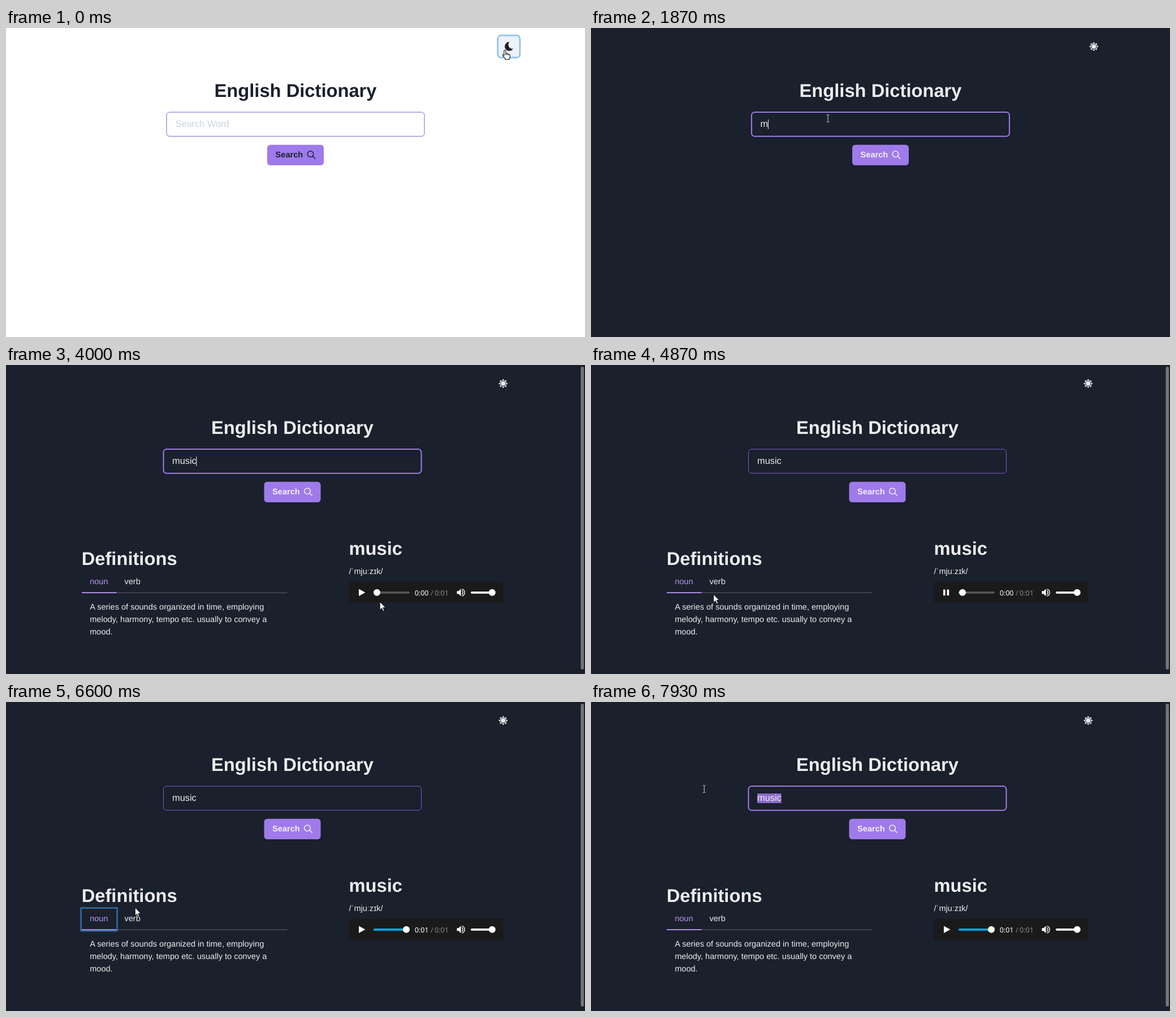
Write an HTML page that moves like this. It is 1024 by 547 pixels and loops after 8 s.

```html
<!DOCTYPE html>
<html lang="en">
<head>
<meta charset="utf-8">
<title>Dictionary</title>
<style>
  html, body { margin: 0; width: 100%; height: 100%; overflow: hidden; }
  svg {
    --bg: #1a202c; --fg: #ededee; --hint: #3e414b; --label: #f4f1fb; --ring: #326999;
    display: block; width: 1024px; height: 547px; background: var(--bg);
    font-family: "Liberation Sans", Arial, sans-serif; font-size: 14.55px;
    text-rendering: geometricPrecision;
  }
  svg.light { --bg: #fff; --fg: #1a202c; --hint: #cbd5da; --label: #1a202c; --ring: #8ec2ed; }
  text { fill: var(--fg); white-space: pre; }
  .title { font-size: 32.7px; font-weight: bold; }
  .field { font-size: 16.36px; }
  .hint { fill: var(--hint); }
  .label { fill: var(--label); font-weight: bold; }
  .time { font: 12.5px "Noto Sans", sans-serif; fill: #fff; }
  .dim { fill: #8a8a8a; }
  .ring { fill: none; stroke: var(--ring); stroke-width: 2.7; }
  .line { fill: none; stroke-linecap: round; }
  #dark, .light #moon { display: inline; }
  #moon, .light #dark { display: none; }
</style>
</head>
<body>
<svg id="stage" viewBox="0 0 1024 547">
  <g id="toggle">
    <g id="moon">
      <rect x="871" y="14.5" width="36.5" height="36.5" rx="5" fill="#edf2f7"/>
      <path d="M890.5 24.6A8 8 0 1 0 897 36.600A7.200 7.200 0 0 1 890.500 24.600Z" fill="#1a202c"/>
    </g>
    <g id="dark" transform="translate(889.3 32.800)">
      <path id="rays" fill="#ededee"/>
      <circle r="4.600" fill="none" stroke="#1a202c" stroke-width="1.100"/>
    </g>
    <rect id="toggleRing" class="ring" x="869.700" y="13.200" width="39.200" height="39.200" rx="6"/>
  </g>

  <g id="search">
    <text class="title" x="512" y="122" text-anchor="middle">English Dictionary</text>
    <rect id="box" x="284" y="149" width="456" height="42.700" rx="5.500" fill="none"/>
    <rect id="mark" y="162" height="17" fill="#8a6bcb"/>
    <text id="hint" class="field hint" x="299.500" y="175">Search Word</text>
    <text id="word" class="field" x="299.500" y="175"></text>
    <rect id="caret" y="162" width="1" height="17" fill="var(--fg)"/>
    <rect x="462" y="206.700" width="100" height="36.300" rx="5.500" fill="#9f7aea"/>
    <text class="label" x="476.600" y="229">Search</text>
    <path class="line" d="M543.800 223.200a5.300 5.300 0 1 1-10.600 0a5.300 5.300 0 1 1 10.600 0M542.500 227l4.300 4.200" stroke="var(--label)" stroke-width="1.500"/>
  </g>

  <g id="spinner" fill="none" stroke-width="3.600">
    <circle r="20" stroke="#e2e8f0"/>
    <path d="M-14.140-14.140A20 20 0 0 1 14.140 14.140" stroke="#805ad5"/>
  </g>

  <g id="result">
    <rect id="thumb" x="1016.500" y="3" width="5.500" height="536" rx="2.700" fill="#757578"/>
    <g id="defs">
      <text class="title" x="133.700" y="354">Definitions</text>
      <rect x="134" y="402.200" width="363.500" height="1.800" fill="#43464d"/>
      <rect id="nounBar" x="134" y="402.200" width="61.500" height="1.800" fill="#b794f4"/>
      <rect id="verbBar" x="195.500" y="402.200" width="57" height="1.800" fill="#b794f4"/>
      <text id="noun" x="148.200" y="388">noun</text>
      <text id="verb" x="209.500" y="388">verb</text>
      <rect id="nounRing" class="ring" x="132.600" y="364.600" width="64" height="40.500"/>
      <rect id="verbRing" class="ring" x="194.100" y="364.600" width="59.700" height="40.500"/>
      <g id="nounText">
        <text x="148.200" y="433.300">A series of sounds organized in time, employing</text>
        <text x="148.200" y="455.100">melody, harmony, tempo etc. usually to convey a</text>
        <text x="148.200" y="476.900">mood.</text>
      </g>
      <text id="verbText" x="148.200" y="433.300">To seduce or entice with music.</text>
    </g>
    <g id="audio">
      <text class="title" x="606.500" y="336">music</text>
      <text x="606.500" y="370">/ˈmjuːzɪk/</text>
      <rect x="606.500" y="384" width="273" height="36.400" fill="#1a1a1a"/>
      <path id="play" d="M624 396.500v12.500l11.500-6.250z" fill="#fff"/>
      <path id="pause" d="M623 397.500h3.600v10.500h-3.600zM629.600 397.500h3.600v10.500h-3.600z" fill="#fff"/>
      <rect id="track" x="650" y="400.900" width="64" height="3.800" rx="1.900"/>
      <rect id="played" x="650" y="400.900" height="3.800" rx="1.900" fill="#03a9f4"/>
      <circle id="knob" cy="402.800" r="6" fill="#fff"/>
      <text id="now" class="time" x="722.700" y="407.500"></text>
      <text class="time dim" x="751" y="407.500">/</text>
      <text id="total" class="time dim" x="758" y="407.500"></text>
      <path d="M797.500 400.200h3l4-4v13l-4-4h-3z" fill="#fff"/>
      <path class="line" d="M806.700 399.600q2.600 3.200 0 6.300M807 396.800c5.500 1.800 5.500 10.200 0 12" stroke="#fff" stroke-width="1.400"/>
      <rect x="822" y="400.900" width="38" height="3.800" rx="1.900" fill="#fff"/>
      <circle cx="859.800" cy="402.800" r="6" fill="#fff"/>
    </g>
  </g>

  <g id="cursor" stroke-linejoin="round">
    <path id="hand" fill="#fff" stroke="#111" stroke-width="1.100" d="M-1.600 9.500V1a1.500 1.500 0 0 1 3 0V5.500l1.800-.2 .8.9 1.800 0 .8.9 1.600.2 .7 1.200v3.500l-1.300 2.500v1.500h-7.500v-1.500l-4-5.200c-.9-1.400 .6-2.300 1.700-1.400zM1.400 5.500V8.500M4 6.200V8.800M6.600 7.100V9"/>
    <path id="arrow" fill="#fff" stroke="#111" d="M0 0V14.500l3.300-3.100 2.300 5.200 2.300-1-2.300-5.100h4.500z"/>
    <path id="beam" fill="none" stroke="#d4d4d4" d="M-2.500-6.500Q-.5-6.500 0-5.500Q.5-6.500 2.500-6.500M0-5.500V5.500M-2.500 6.500Q-.5 6.500 0 5.500Q.5 6.500 2.500 6.500"/>
  </g>
</svg>
<script>
const LOOP = 8000, TICK = 200 / 3;
const el = {};
document.querySelectorAll('[id]').forEach(n => el[n.id] = n);

const clamp = v => Math.max(0, Math.min(1, v));
const ramp = (t, from, span = 200) => clamp((t - from) / span);
const within = (t, a, b) => t >= a && t < b;
const set = (node, attrs) => { for (const k in attrs) node.setAttribute(k, attrs[k]); };
const show = (node, on) => { node.style.visibility = on ? 'inherit' : 'hidden'; };
const move = (node, x, y = 0) => set(node, { transform: `translate(${x} ${y})` });
const mix = (a, b, p) => `rgb(${a.map((v, i) => Math.round(v + (b[i] - v) * p))})`;
const WHITE = [237, 237, 238], PURPLE = [183, 148, 244];

// time, x, y, shape
const PATH = [
  [0, 882.5, 39.5, 'hand'], [660, 882.5, 39.5, 'hand'],
  [661, 432, 139.5, 'arrow'], [740, 432, 139.5, 'arrow'],
  [860, 424, 153, 'beam'], [1060, 419, 160, 'beam'], [3400, 419, 160, 'beam'],
  [3500, 470, 230, 'arrow'], [3720, 594, 403, 'arrow'], [3860, 594, 403, 'arrow'],
  [4060, 690, 426, 'arrow'], [4190, 627, 409, 'arrow'], [4600, 627, 409, 'arrow'],
  [4860, 217, 406.5, 'arrow'], [4990, 212, 398, 'hand'], [5120, 219, 391, 'hand'],
  [5260, 222, 389, 'hand'], [5800, 222, 389, 'hand'], [5990, 179, 384, 'hand'],
  [6460, 179, 384, 'hand'], [6595, 227, 365, 'arrow'], [6730, 262, 332, 'arrow'],
  [7130, 325, 246, 'arrow'], [7260, 344, 185, 'beam'], [7330, 340, 170, 'beam'],
  [7400, 340, 170, 'beam'], [7700, 240, 160, 'beam'], [7920, 187.5, 152, 'beam'],
  [LOOP, 187.5, 152, 'beam']
];
// time, letters typed, caret offset
const TYPED = [[0, 0, 0], [1860, 1, 13.5], [2060, 2, 22], [2130, 3, 30.5], [2330, 5, 42.3]];

function pointer(t) {
  const i = PATH.findIndex(k => k[0] > t);
  const a = PATH[i - 1], b = PATH[i], p = (t - a[0]) / (b[0] - a[0]);
  return { x: a[1] + (b[1] - a[1]) * p, y: a[2] + (b[2] - a[2]) * p, shape: a[3] };
}

function drawSearch(t, cur) {
  const focus = ramp(t, 1140) - ramp(t, 4370) + ramp(t, 7270);
  const [, count, offset] = TYPED.filter(k => k[0] <= t).pop();
  set(el.box, {
    stroke: mix([128, 90, 213], [159, 122, 234], focus),
    'stroke-width': 1 + focus
  });
  el.word.textContent = 'music'.slice(0, count);
  show(el.hint, !count);
  show(el.caret, within(t, 1190, 2860) || within(t, 3460, 4400));
  set(el.caret, { x: 299.5 + offset });
  const end = 342.2, start = Math.max(299.5, Math.min(end, cur.x + 5.5));
  show(el.mark, t >= 7390);
  set(el.mark, { x: start, width: end - start });
}

function drawTabs(t, verb) {
  const verbSel = ramp(t, 5400) - ramp(t, 6066);
  const nounSel = ramp(t, 2790) - verbSel;
  set(el.nounBar, { opacity: nounSel });
  set(el.verbBar, { opacity: verbSel });
  el.noun.style.fill = mix(WHITE, PURPLE, nounSel);
  el.verb.style.fill = mix(WHITE, PURPLE, verbSel);
  set(el.nounRing, { opacity: ramp(t, 6150) - ramp(t, 7270) });
  set(el.verbRing, { opacity: verb ? ramp(t, 5467) : 0 });
  show(el.nounText, !verb);
  show(el.verbText, verb);
}

function drawAudio(t) {
  const loaded = t >= 2930, playing = within(t, 4395, 6265);
  const x = 656 + 52 * ramp(t, 4838, 1425);
  show(el.play, !playing);
  show(el.pause, playing);
  set(el.track, { fill: loaded ? '#555' : '#080808' });
  set(el.played, { width: x - 650 });
  show(el.played, t >= 4660);
  set(el.knob, { cx: x });
  el.now.textContent = t < 5260 ? '0:00' : '0:01';
  el.total.textContent = loaded ? '0:01' : '0:00';
}

function draw(ms) {
  const t = Math.floor((ms + 2) / TICK) * TICK;
  const cur = pointer(t);
  const found = t >= 2860, verb = within(t, 5460, 6130), scroll = found && !verb;

  el.stage.classList.toggle('light', t < 660);
  set(el.toggleRing, { opacity: 1 - ramp(t, 1140) });
  move(el.toggle, scroll ? -10 : 0);
  move(el.search, scroll ? -5.5 : 0);
  drawSearch(t, cur);

  show(el.spinner, within(t, 2595, 2860));
  set(el.spinner, { transform: `translate(512 295.500) rotate(${(t - 2600) * 360 / 650})` });

  show(el.result, found);
  show(el.thumb, scroll);
  move(el.defs, verb ? 3 : 0);
  move(el.audio, verb ? 7 : 0);
  drawTabs(t, verb);
  drawAudio(t);
  if (!found) for (const n of [el.nounText, el.verbText, el.thumb, el.play, el.pause, el.played]) show(n, false);

  move(el.cursor, cur.x, cur.y);
  for (const s of ['hand', 'arrow', 'beam']) show(el[s], s === cur.shape);
}

const rays = Array.from({ length: 16 }, (_, i) => {
  const r = i % 2 ? 5.6 : 8.3, a = i * Math.PI / 8;
  return `${(r * Math.sin(a)).toFixed(2)} ${(-r * Math.cos(a)).toFixed(2)}`;
});
set(el.rays, { d: `M${rays.join('L')}Z` });

const begin = performance.now();
function loop() {
  draw((performance.now() - begin) % LOOP);
  requestAnimationFrame(loop);
}
loop();
</script>
</body>
</html>
```
